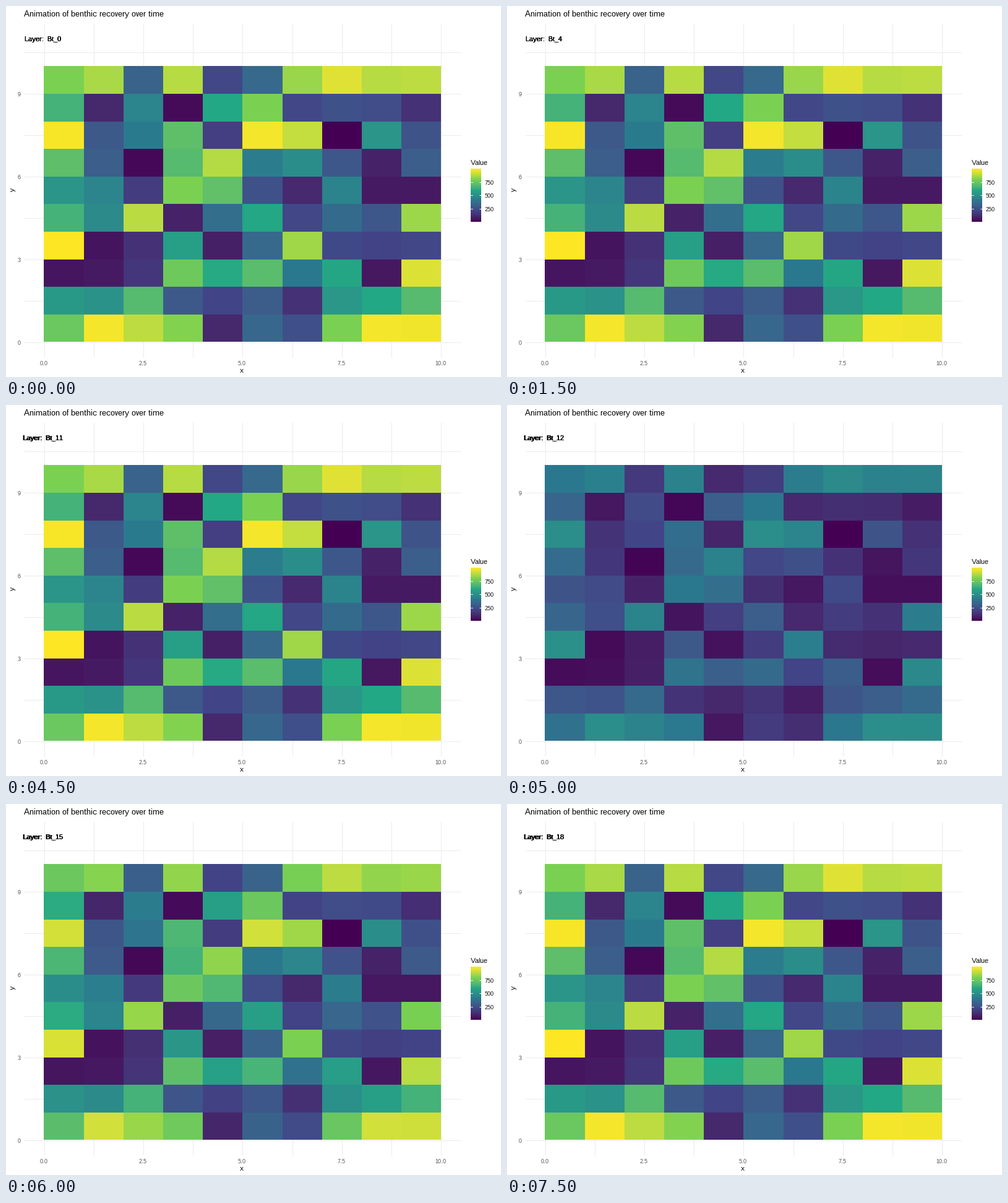
These frames come from a looping animation (800x600 px, 8 s). A matplotlib script:

```python
import matplotlib.pyplot as plt
import numpy as np
from matplotlib.animation import FuncAnimation
from matplotlib.colors import ListedColormap, to_rgb

plt.rcParams.update({
    "font.family": "Liberation Sans",
    "text.hinting": "default",
    "text.hinting_factor": 1,
})

W, H, DPI = 800, 600, 100
PX = 72 / DPI
STEPS, STEP_MS = 16, 500

# Fully recovered state, percent of the scale, top row first
COVER = np.array([
    [80, 86.5, 32, 88.5, 21, 34, 84, 95, 88.5, 89.5],
    [65, 10, 45, 2, 60, 80, 21, 25, 23.5, 13],
    [99, 28, 41, 71.5, 18, 98.5, 90.5, 0, 52, 26],
    [71, 30, 1.5, 69, 88, 42, 49, 27, 8.5, 30],
    [52, 45.5, 17, 80, 72, 25, 10.5, 44.5, 5.5, 5.5],
    [65, 48, 89, 8, 36, 59.5, 21, 35, 27, 84.5],
    [100, 4, 13.5, 56, 7.5, 34, 85, 22, 19.5, 21],
    [4.5, 5.5, 15, 76, 60.5, 70, 40, 59, 5, 94.5],
    [54, 51, 69, 28, 20, 29, 13.5, 53, 60, 69],
    [75, 98.5, 89.5, 81, 10, 33.5, 24, 79.5, 98.5, 98],
]) / 100
# Share of the full cover right after the disturbance, by layer
RECOVERY = {12: 0.5, 13: 0.68, 14: 0.83, 15: 0.94}

TO_XYZ = np.array([[0.4124, 0.3576, 0.1805],
                   [0.2126, 0.7152, 0.0722],
                   [0.0193, 0.1192, 0.9505]])
WHITE = TO_XYZ.sum(axis=1)


def rgb_to_lab(rgb):
    lin = np.where(rgb > 0.04045, ((rgb + 0.055) / 1.055) ** 2.4, rgb / 12.92)
    t = lin @ TO_XYZ.T / WHITE
    f = np.where(t > 0.008856, np.cbrt(t), 7.787 * t + 16 / 116)
    x, y, z = f.T
    return np.column_stack([116 * y - 16, 500 * (x - y), 200 * (y - z)])


def lab_to_rgb(lab):
    y = (lab[:, 0] + 16) / 116
    f = np.column_stack([y + lab[:, 1] / 500, y, y - lab[:, 2] / 200])
    t = np.where(f > 0.2069, f ** 3, (f - 16 / 116) / 7.787)
    lin = np.clip((t * WHITE) @ np.linalg.inv(TO_XYZ).T, 0, 1)
    rgb = np.where(lin > 0.0031308, 1.055 * lin ** (1 / 2.4) - 0.055, 12.92 * lin)
    return np.clip(rgb, 0, 1)


def lab_ramp(colors, n=1024):
    stops = rgb_to_lab(np.array([to_rgb(c) for c in colors]))
    pos = np.linspace(0, 1, len(colors))
    t = np.linspace(0, 1, n)
    lab = np.column_stack([np.interp(t, pos, s) for s in stops.T])
    return ListedColormap(lab_to_rgb(lab))


CMAP = lab_ramp(["#440154", "#414487", "#2A788E", "#22A884", "#7AD151", "#FDE725"])

fig = plt.figure(figsize=(W / DPI, H / DPI), dpi=DPI, facecolor="white")
ax = fig.add_axes([0, 0, 1, 1])
ax.set(xlim=(0, W), ylim=(H, 0))
ax.axis("off")


def label(x, y, text, size=11, **kw):
    return ax.text(x, y, text, fontsize=size * PX, **{"color": "black", **kw})


# Panel grid
line = dict(color="#EBEBEB", lw=PX, zorder=1)
ax.vlines([v + 0.5 for v in (61, 141, 221, 301, 381, 462, 542, 622, 702)],
          28, 568, **line)
ax.hlines([v + 0.5 for v in (74, 141, 208, 275, 342, 409, 476, 543)],
          29, 735, **line)

# Tiles
x_edges = np.round(61.4 + 64.2 * np.arange(11))
y_edges = np.round(97.4 + 44.6 * np.arange(11))
tiles = ax.pcolormesh(x_edges, y_edges, COVER, cmap=CMAP, vmin=0, vmax=1,
                      antialiased=False, zorder=2)
ax.set(xlim=(0, W), ylim=(H, 0))

# Axes and title
label(29, 17, "Animation of benthic recovery over time", 13)
for x, s in zip((61, 221, 381, 542, 702), ("0.0", "2.5", "5.0", "7.5", "10.0")):
    label(x, 581, s, 9, ha="center", color="#4D4D4D")
for y, s in zip((146, 280, 414, 548), "9630"):
    label(24, y, s, 9, ha="right", color="#4D4D4D")
label(381, 593, "x", ha="center")
label(11, 297, "y", rotation=90, ha="center", va="center")

# Colour bar
label(751, 257, "Value")
ax.imshow(np.linspace(1, 0, 86)[:, None], cmap=CMAP, vmin=0, vmax=1, aspect="auto",
          extent=(751, 768, 349, 263), interpolation="nearest", zorder=2)
ax.set(xlim=(0, W), ylim=(H, 0))
for y, s in zip((285, 306, 328), ("750", "500", "250")):
    ax.hlines([y - 0.5] * 2, [751, 765], [754, 768], color="white", lw=PX, zorder=3)
    label(774, y + 4, s, 9)

# The layer name is overprinted, which makes it look heavier
names = [label(30, 57, "", zorder=4) for _ in range(4)]
ghost = label(28, 57, "", zorder=4)


def draw(step):
    layer = int(1.2 * step + 0.7)
    wide = layer > 9
    for name in names:
        name.set_text(f"Layer:  Bt_{layer}")
        name.set_x(27 if wide else 30)
    ghost.set_text("Layer:  Bt" if wide else "")
    tiles.set_array(COVER * RECOVERY.get(layer, 1))
    return [tiles, ghost, *names]


anim = FuncAnimation(fig, draw, frames=STEPS, interval=STEP_MS, repeat=True,
                     repeat_delay=0, blit=False)
plt.show()
```
